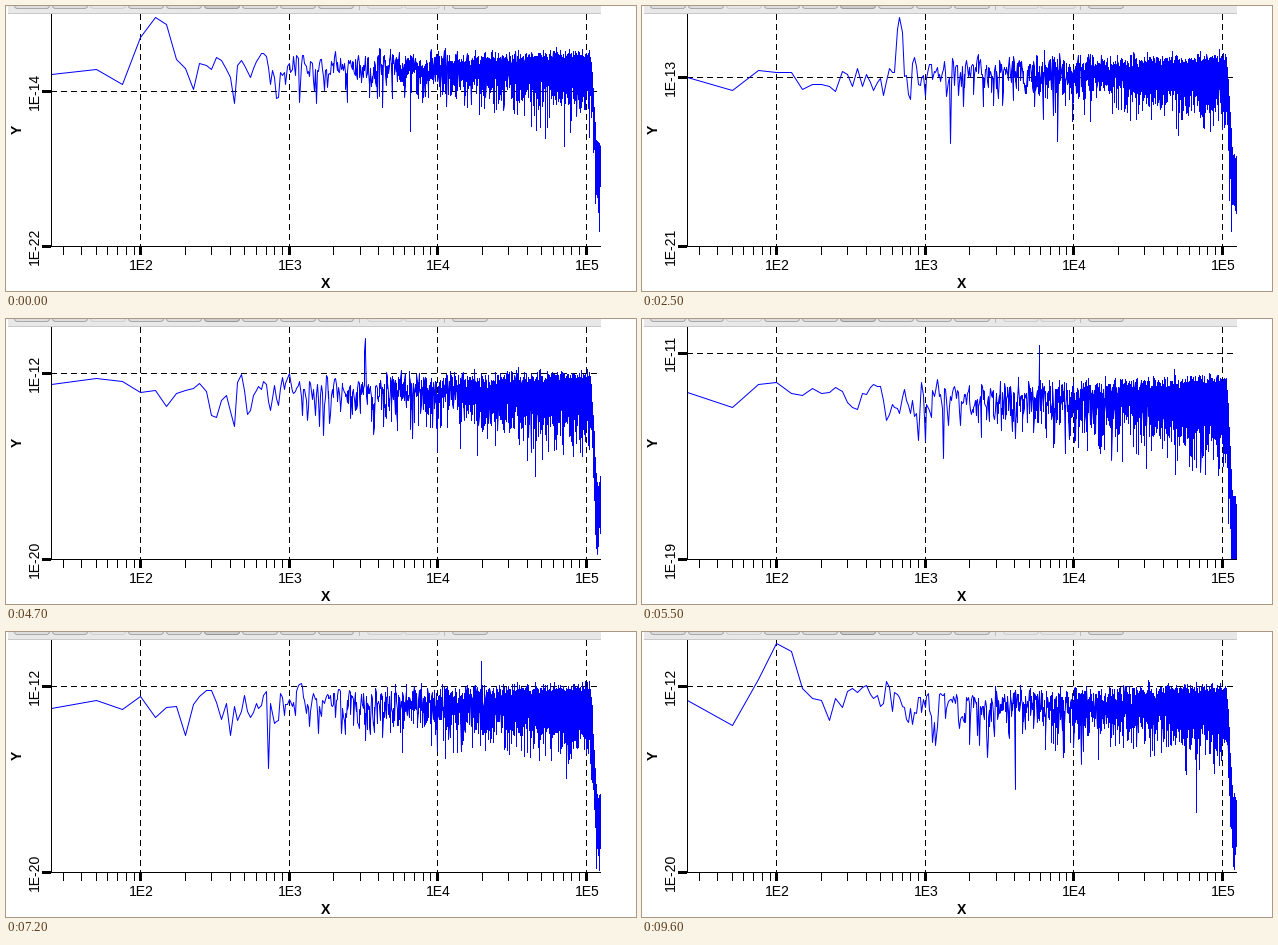
These frames come from a looping animation (630 by 285 pixels, 9.7 s). A matplotlib script:

```python
import matplotlib.pyplot as plt
import numpy as np
from matplotlib.animation import FuncAnimation
from matplotlib.patches import FancyBboxPatch, Rectangle

W, H, DPI = 630, 285, 100
PX = 72 / DPI
LEFT, RIGHT, TOP, BASE = 45, 595, 8, 240
BIN_HZ, BINS = 25, 5000
FLOOR, CEIL = -12.65, -10    # mean noise and axis top, log10 of power
TICK_MS, LOOP_MS, STEPS = 100, 9700, 36

# Most sweep steps last 300 ms, every fourth or so only 200 ms
SHORT = {1, 5, *range(10, STEPS, 4)}
STARTS = np.cumsum([0] + [200 if s in SHORT else 300 for s in range(STEPS - 1)])

# Course of the sweep: tone position in pixels and lowest decade of the axis
KEY_STEP = [0, 6, 13, 20, 26, 30, 34, 35]
KEY_TONE = [151.3, 218, 308, 397, 475, 518, 565, 139.8]
KEY_LOW = [-22, -21, -21, -19, -20, -20, -20, -20]

X_SCALE = (RIGHT - 1 - LEFT) / np.log(BINS)


def x_of(hz):
    return LEFT + X_SCALE * np.log(hz / BIN_HZ)


def y_of(power, low):
    return BASE - (power - low) * (BASE - TOP) / (CEIL - low)


bins = np.arange(1, BINS + 1)
freq = BIN_HZ * bins
xs = np.round(x_of(freq)) + 0.5
ramp = np.clip((freq - 106e3) / 13.5e3, 0, 1)
rolloff = 4.7 * ramp ** 2 * (3 - 2 * ramp)


def hann_lobe(d):
    return np.sinc(d) + 0.5 * (np.sinc(d - 1) + np.sinc(d + 1))


def spectrum(step):
    """Lowest decade and log power of a Hann-windowed tone in white noise."""
    rng = np.random.default_rng(100 + step)
    z = rng.normal(size=BINS + 2) + 1j * rng.normal(size=BINS + 2)
    z = np.convolve(z, [-0.5, 1, -0.5], "valid") / np.sqrt(3)

    tone = np.interp(step, KEY_STEP, KEY_TONE)
    center = np.exp((tone - LEFT) / X_SCALE)
    if center > 20:
        center = round(center)
    level = np.interp(tone, [308, 397, 475], [-10.15, -10.7, -10.95])
    z += 10 ** ((level - FLOOR) / 2) * hann_lobe(bins - center)

    low = round(np.interp(step, KEY_STEP, KEY_LOW))
    power = FLOOR - rolloff + np.log10(np.abs(z) ** 2)
    power[power.argmin()] = low + rng.uniform(0.05, 0.9)
    return low, np.clip(power, low + 0.05, CEIL - 0.05)


SPECTRA = [spectrum(s) for s in range(STEPS)]

plt.rcParams["font.family"] = "Liberation Sans"
plt.rcParams["path.simplify"] = False
fig = plt.figure(figsize=(W / DPI, H / DPI), dpi=DPI, facecolor="white")
ax = fig.add_axes([0, 0, 1, 1])
ax.set_xlim(0, W)
ax.set_ylim(H, 0)
ax.axis("off")


def box(x, y, w, h, color="black", z=3):
    return ax.add_patch(Rectangle((x, y), w, h, fc=color, lw=0, aa=False, zorder=z))


def label(x, y, text, turn=0, weight="normal"):
    return ax.text(x, y, text, size=14 * PX, weight=weight, rotation=turn,
                   rotation_mode="anchor", ha="center", va="baseline")


def line(x, y, color="black", **style):
    # Unsnapped, so that half-pixel coordinates fill exactly one pixel
    return ax.plot(x, y, color=color, lw=PX, snap=False, solid_capstyle="butt",
                   dash_capstyle="butt", **style)[0]


def dashed(x, y):
    return line(x, y, ls=(0, (6, 4)), zorder=1)


def button(x, face, edge):
    ax.add_patch(FancyBboxPatch((x + 3, -20), 29, 19.5, fc=face, ec=edge, lw=PX,
                                boxstyle="round,pad=3,rounding_size=3", zorder=2))


# Lower edge of the toolbar
box(2, 0, 593, 8, "#e8e8e8", 1)
box(2, 7, 593, 1, "#c8c8c8", 1)
for x in (8.5, 46.5, 122.5, 160.5, 236.5, 274.5, 312.5, 446.5):
    button(x, "#dedede", "#a8a8a8")
for x in (84.5, 361.5, 398.5):
    button(x, "#e6e6e6", "#cfcfcf")
button(198.5, "#cccccc", "#989898")
for x in (353, 438):
    box(x, 0, 1, 4, "#bcbcbc", 2)

# Axes, ticks and grid
box(LEFT, TOP, 1, BASE - TOP)
box(LEFT, BASE, RIGHT - LEFT, 1)
box(36, BASE - 1, 9, 3)
for exp in range(1, 6):
    for m in range(1, 10):
        hz = m * 10 ** exp
        if not BIN_HZ < hz <= 1e5:
            continue
        x = round(x_of(hz))
        if m > 1:
            box(x, BASE, 1, 9)
            continue
        box(x - 1, BASE, 3, 9)
        dashed([x + 0.5] * 2, [TOP, BASE])
        label(x + 1.5, 264, f"1E{exp}")
label(320, 282, "X", weight="bold")
label(16, 123, "Y", 90, "bold")

grid = dashed([LEFT, RIGHT], [0, 0])
tick = box(36, 0, 9, 3)
tick_text = label(32.5, 0, "", 90)
low_text = label(32.5, BASE, "", 90)
curve = line([], [], "#0000ff", zorder=2)
curve.set_clip_path(Rectangle((LEFT, TOP), RIGHT - LEFT, BASE - TOP,
                              transform=ax.transData))


def draw(i):
    step = np.searchsorted(STARTS, i * TICK_MS, "right") - 1
    low, power = SPECTRA[step]
    curve.set_data(xs, np.round(y_of(power, low)) + 0.5)
    y = round(y_of(low + 8, low))
    grid.set_ydata([y + 0.5] * 2)
    tick.set_y(y - 1)
    tick_text.set_position((32.5, y))
    tick_text.set_text(f"1E{low + 8}")
    low_text.set_text(f"1E{low}")
    return curve, grid, tick, tick_text, low_text


anim = FuncAnimation(fig, draw, frames=LOOP_MS // TICK_MS, interval=TICK_MS,
                     repeat=True, repeat_delay=0, blit=False)
plt.show()
```
